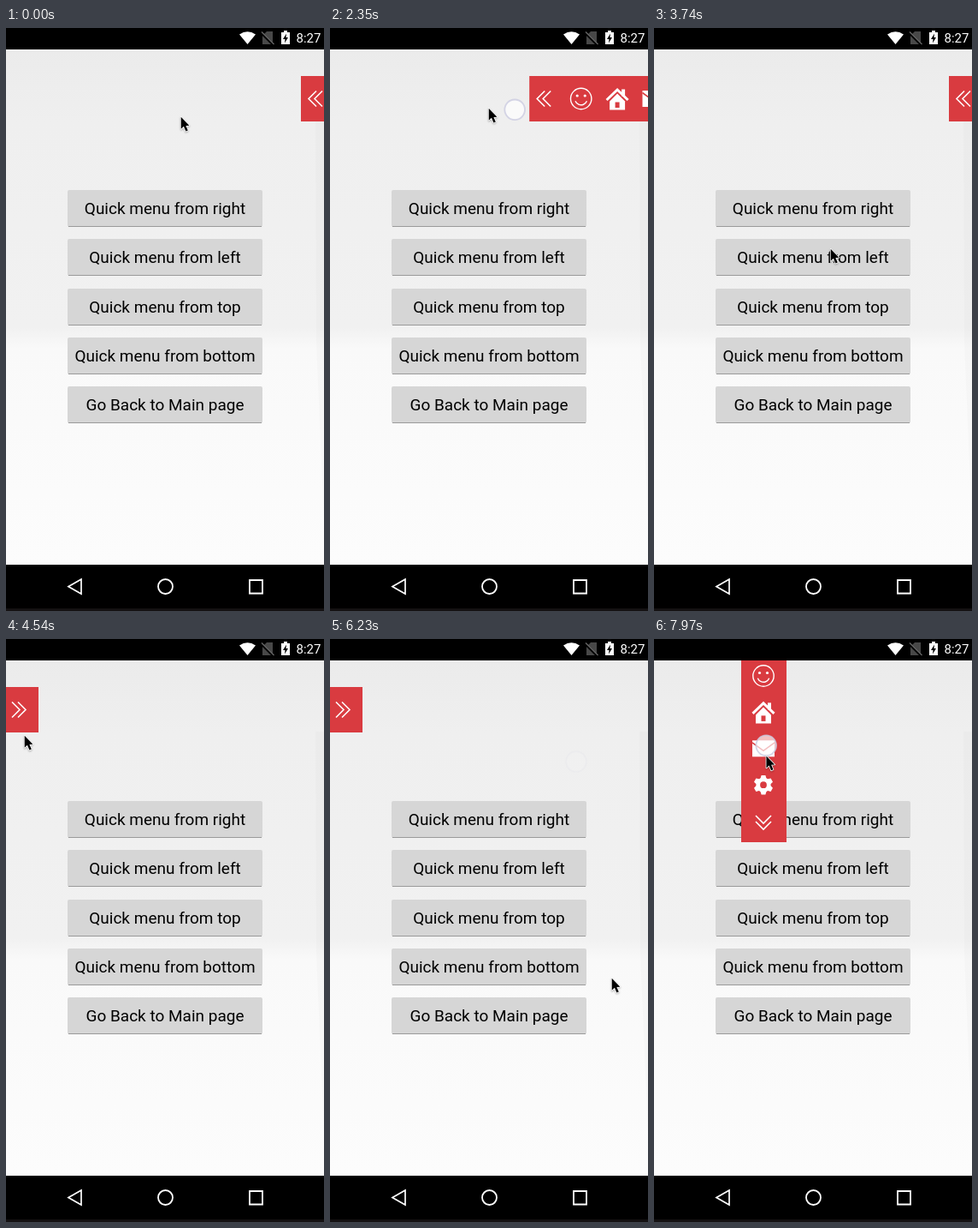
An HTML page with a canvas for the animation above (8 s loop, 372 by 680 pixels).

```html
<!DOCTYPE html>
<html lang="en">
<head>
<meta charset="utf-8">
<title>Quick menu demo</title>
<style>
html, body { margin: 0; width: 100%; height: 100%; overflow: hidden; background: #000; }
canvas { display: block; }
</style>
</head>
<body>
<canvas width="372" height="680"></canvas>
<script>
const ctx = document.querySelector('canvas').getContext('2d');
const LOOP = 8000, RED = '#d93b40', TAU = Math.PI * 2;
const LABELS = ['Quick menu from right', 'Quick menu from left', 'Quick menu from top',
  'Quick menu from bottom', 'Go Back to Main page'];

// Each glide runs from its start time to its end time and stops at the given place.
const pointer = {
  home: [204, 103],
  glides: [
    [540, 1200, 359, 92],
    [1370, 1710, 141, 81], [1780, 2110, 340, 100],
    [2130, 2410, 165, 92], [2500, 2720, 335, 105],
    [2740, 2940, 284, 223], [2990, 3300, 255, 291], [3350, 3740, 206, 257],
    [4060, 4540, 21, 112], [4560, 4720, 12, 88],
    [4860, 5460, 287, 142], [6010, 6230, 329, 395], [6400, 6760, 245, 326],
    [7030, 7650, 127, 48], [7710, 8020, 131, 142]
  ]
};
// Visible edge of each menu
const menus = {
  right: { home: [345], glides: [[1400, 1815, 160], [1860, 2110, 345], [2180, 2480, 160], [2560, 2800, 345]] },
  left: { home: [38], glides: [[4900, 5400, 212], [5990, 6170, 38]] },
  top: { home: [62], glides: [[7740, 7960, 237]] }
};
// Times when the finger is down
const presses = [[1380, 2060], [2150, 2640], [3890, 3990], [4870, 5420], [5970, 6010], [6870, 6950], [7710, 8000]];
const LAG = 40, FADE_IN = 40, FADE_OUT = 250;

const clamp = v => Math.min(1, Math.max(0, v));
const ease = u => u * u * (3 - 2 * u);

function at({ home, glides }, t) {
  return glides.reduce((pos, [start, end, ...to]) => {
    const u = ease(clamp((t - start) / (end - start)));
    return pos.map((v, i) => v + (to[i] - v) * u);
  }, home);
}

function rect(x, y, w, h, color) {
  ctx.fillStyle = color;
  ctx.fillRect(x, y, w, h);
}

function fill(path, color) {
  ctx.fillStyle = color;
  ctx.fill(new Path2D(path));
}

function stroke(path, color, width) {
  ctx.strokeStyle = color;
  ctx.lineWidth = width;
  ctx.stroke(new Path2D(path));
}

function disc(x, y, r, color) {
  ctx.beginPath();
  ctx.arc(x, y, r, 0, TAU);
  ctx.fillStyle = color;
  ctx.fill();
}

function arc(x, y, r, color, width, from = 0, to = TAU) {
  ctx.beginPath();
  ctx.arc(x, y, r, from, to);
  ctx.strokeStyle = color;
  ctx.lineWidth = width;
  ctx.stroke();
}

const icons = {
  chevrons() {
    stroke('M-7.5-9 1.5 0-7.5 9M-.5-9 8.5 0-.5 9', '#fff', 1.6);
  },
  smile() {
    arc(0, 0, 12.2, '#fff', 1.4);
    disc(-4.5, -3.5, 1.6, '#fff');
    disc(4.5, -3.5, 1.6, '#fff');
    arc(0, 0, 7.3, '#fff', 1.4, .4, Math.PI - .4);
  },
  home() {
    rect(5, -11, 4, 8, '#fff');
    stroke('M-12.5 1.5 0-10.5 12.5 1.5', '#fff', 3);
    fill('M-9 3 0-6 9 3V13H-9Z', '#fff');
    rect(-2.5, 4, 5, 6.5, RED);
  },
  mail() {
    rect(-13, -9.5, 26, 19, '#fff');
    stroke('M-13-7 0 2.5 13-7', RED, 1.6);
  },
  gear() {
    for (let i = 0; i < 6; i++) {
      ctx.rotate(TAU / 6);
      fill('M-3.6-7-2.4-11.3H2.4L3.6-7Z', '#fff');
    }
    disc(0, 0, 8.6, '#fff');
    disc(0, 0, 3.9, RED);
  }
};

function icon(name, x, y, turn = 0) {
  ctx.save();
  ctx.translate(x, y);
  ctx.rotate(turn);
  icons[name]();
  ctx.restore();
}

function menu(side, t) {
  const [edge] = at(menus[side], t);
  const names = ['smile', 'home', 'mail', 'gear'];
  if (side === 'right') {
    rect(edge, 56, 213, 53, RED);
    icon('chevrons', edge + 17.5, 82.5, Math.PI);
    names.forEach((name, i) => icon(name, edge + 60.5 + i * 42.4, 82.5));
    return;
  }
  const top = side === 'top';
  const put = (name, back, turn) => top ? icon(name, 128, edge - back, turn) : icon(name, edge - back, 82.5, turn);
  if (top) rect(102, edge - 213, 53, 213, RED);
  else rect(edge - 213, 56, 213, 53, RED);
  put('chevrons', 23.5, top ? Math.PI / 2 : 0);
  names.forEach((name, i) => put(name, 194 - i * 42.4));
}

function background() {
  const g = ctx.createLinearGradient(0, 25, 0, 626);
  g.addColorStop(0, '#ebebeb');
  g.addColorStop(.14, '#efefef');
  g.addColorStop(.54, '#f1f1f1');
  g.addColorStop(.58, '#f9f9f9');
  g.addColorStop(1, '#fcfcfc');
  rect(0, 25, 372, 601, g);
  fill('M362 108H372V580L363 370Z', 'rgba(0,0,0,.015)');
}

function buttons() {
  ctx.font = '19px Roboto, sans-serif';
  ctx.textAlign = 'center';
  LABELS.forEach((label, i) => {
    const y = Math.round(189.1 + i * 57.25);
    ctx.beginPath();
    ctx.roundRect(72, y, 228, 43, 2);
    ctx.fillStyle = '#d6d6d6';
    ctx.fill();
    rect(73, y + 42, 226, 1, '#9a9a9a');
    ctx.fillStyle = '#000';
    ctx.fillText(label, 186, y + 28);
  });
}

function bars() {
  rect(0, 0, 372, 25, '#000');
  fill('M282.5 19 273 7.5Q282.5.8 292 7.5Z', '#fff');
  // no SIM
  fill('M300 9 305 4H312V19H300Z', '#484848');
  stroke('M298 5 313 20', '#000', 3);
  stroke('M299 4.5 313.5 19', '#6a6a6a', 1.3);
  // charging battery
  fill('M322 5H325V3H329V5H332V19H322Z', '#fff');
  fill('M328 6.5 324 13H326.5L326 17.5 330 11H327.5Z', '#000');
  ctx.font = '15px Roboto, sans-serif';
  ctx.textAlign = 'left';
  ctx.fillStyle = '#fff';
  ctx.fillText('8:27', 339.5, 17);

  rect(0, 626, 372, 54, '#000');
  rect(0, 677, 372, 3, '#141112');
  stroke('M73 651.5 88 643V660Z', '#fff', 1.7);
  arc(186.5, 651.5, 8.5, '#fff', 1.8);
  stroke('M285 644H300V659.5H285Z', '#fff', 1.8);
}

function touch([down, up], t) {
  const alpha = clamp((t - down) / FADE_IN) * clamp(1 - (t - up) / FADE_OUT);
  if (!alpha) return;
  const [x, y] = at(pointer, Math.min(t, up) - LAG);
  ctx.globalAlpha = alpha;
  disc(x + 1, y + 1, 12, 'rgba(255,255,255,.68)');
  arc(x + 1, y + 1, 11.8, 'rgba(203,203,224,.8)', 1.8);
  ctx.globalAlpha = 1;
}

function cursor(t) {
  const arrow = 'M.7.8V14.8L3.9 11.8 6.4 17.6 8.8 16.5 6.4 11 10.4 10.8Z';
  ctx.save();
  ctx.translate(...at(pointer, t));
  ctx.lineJoin = 'round';
  ctx.shadowColor = 'rgba(0,0,0,.3)';
  ctx.shadowBlur = 2;
  ctx.shadowOffsetY = 1;
  stroke(arrow, '#fff', 1.6);
  ctx.shadowColor = 'transparent';
  fill(arrow, '#000');
  ctx.restore();
}

function draw(t) {
  background();
  buttons();
  menu(t < 4060 ? 'right' : t < 7030 ? 'left' : 'top', t);
  bars();
  presses.forEach(press => touch(press, t));
  cursor(t);
}

const start = performance.now();
function tick() {
  draw((performance.now() - start) % LOOP);
  requestAnimationFrame(tick);
}
tick();
</script>
</body>
</html>
```
